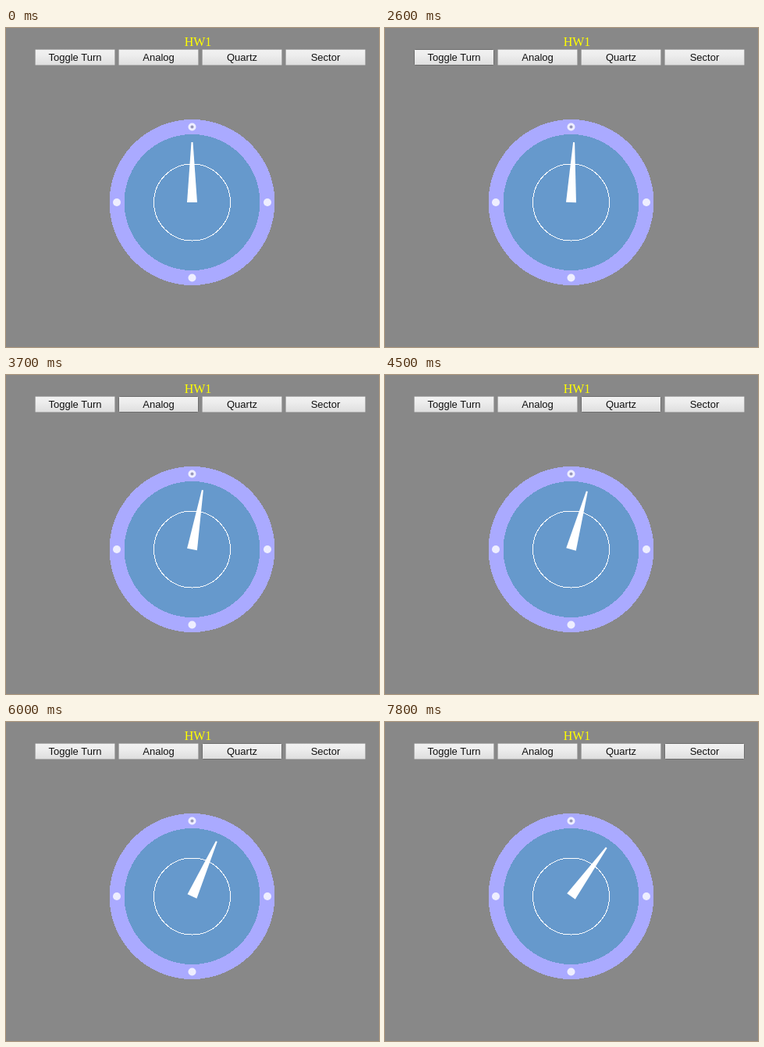
These frames come from a looping animation (478 by 408 pixels, 8000 ms). An HTML page:

```html
<!DOCTYPE html>
<html>
<head>
<meta charset="utf-8">
<style>
  html, body { margin: 0; width: 100%; height: 100%; overflow: hidden; background: #888; }
  svg { display: block; }
  .label { font: 13px "Liberation Sans", Arial, sans-serif; fill: #111; text-anchor: middle; }
  .title { font: 16px "Liberation Serif", "Times New Roman", serif; fill: #ff0; text-anchor: middle; }
</style>
</head>
<body>
<svg width="478" height="408" viewBox="0 0 478 408">
  <defs>
    <linearGradient id="up" x2="0" y2="1">
      <stop offset="0" stop-color="#f2f2f2"/><stop offset=".38" stop-color="#ededed"/><stop offset="1" stop-color="#dedede"/>
    </linearGradient>
    <linearGradient id="down" x2="0" y2="1">
      <stop offset=".38" stop-color="#e7e7e7"/><stop offset="1" stop-color="#d7d7d7"/>
    </linearGradient>
  </defs>
  <rect width="478" height="408" fill="#888"/>
  <text class="title" x="246" y="23">HW1</text>
  <g id="buttons"></g>
  <g transform="translate(238.5 223)" shape-rendering="crispEdges">
    <circle r="106" fill="#aaf"/>
    <circle r="87" fill="#69c"/>
    <circle r="49" fill="none" stroke="#fff"/>
    <g fill="#eef" shape-rendering="auto">
      <circle cx="-96.5" r="5"/>
      <circle cx="96.5" r="5"/>
      <circle cy="96.5" r="5"/>
      <circle cy="-96.5" r="5"/>
      <circle cy="-96.5" r="2" fill="#99b"/>
    </g>
    <path id="hand" d="M-1 -77H1L6.5 0H-6.5Z" fill="#fff" shape-rendering="auto"/>
  </g>
</svg>
<script>
const LOOP = 8000, STEP = 100;

// Pointer visits: button index, start, end
const hovers = [
  [3, 700, 800], [1, 1000, 1500], [0, 1500, 3300],
  [1, 3300, 3800], [2, 3900, 6100], [3, 7700, 8000]
];
const presses = [[0, 2100, 2200], [2, 4900, 5000]];

const NS = 'http://www.w3.org/2000/svg';
const group = document.getElementById('buttons');
const hand = document.getElementById('hand');

function add(tag, attrs) {
  const el = document.createElementNS(NS, tag);
  for (const key in attrs) el.setAttribute(key, attrs[key]);
  return group.appendChild(el);
}

const buttons = ['Toggle Turn', 'Analog', 'Quartz', 'Sector'].map((name, i) => {
  const x = 37 + i * 107;
  const face = add('rect', { x: x + 0.5, y: 27.5, width: 102, height: 20, rx: 1 });
  add('text', { x: x + 51.5, y: 42, class: 'label' }).textContent = name;
  return face;
});

const active = (list, i, t) => list.some(([n, from, to]) => n === i && t >= from && t < to);

// Smooth sweep first, then whole-second ticks
function angle(t) {
  if (t < 5000) return Math.max(0, t - 2200) / 150;
  return 18 + 6 * Math.max(0, Math.floor((t - 5100) / 900));
}

function draw(time) {
  const t = Math.floor((time % LOOP) / STEP) * STEP;
  buttons.forEach((face, i) => {
    face.setAttribute('fill', active(presses, i, t) ? 'url(#down)' : 'url(#up)');
    face.setAttribute('stroke', active(hovers, i, t) ? '#6e6e6e' : '#adadad');
  });
  hand.setAttribute('transform', `rotate(${angle(t)})`);
}

const start = performance.now();
function tick() {
  draw(performance.now() - start);
  requestAnimationFrame(tick);
}
tick();
</script>
</body>
</html>
```
